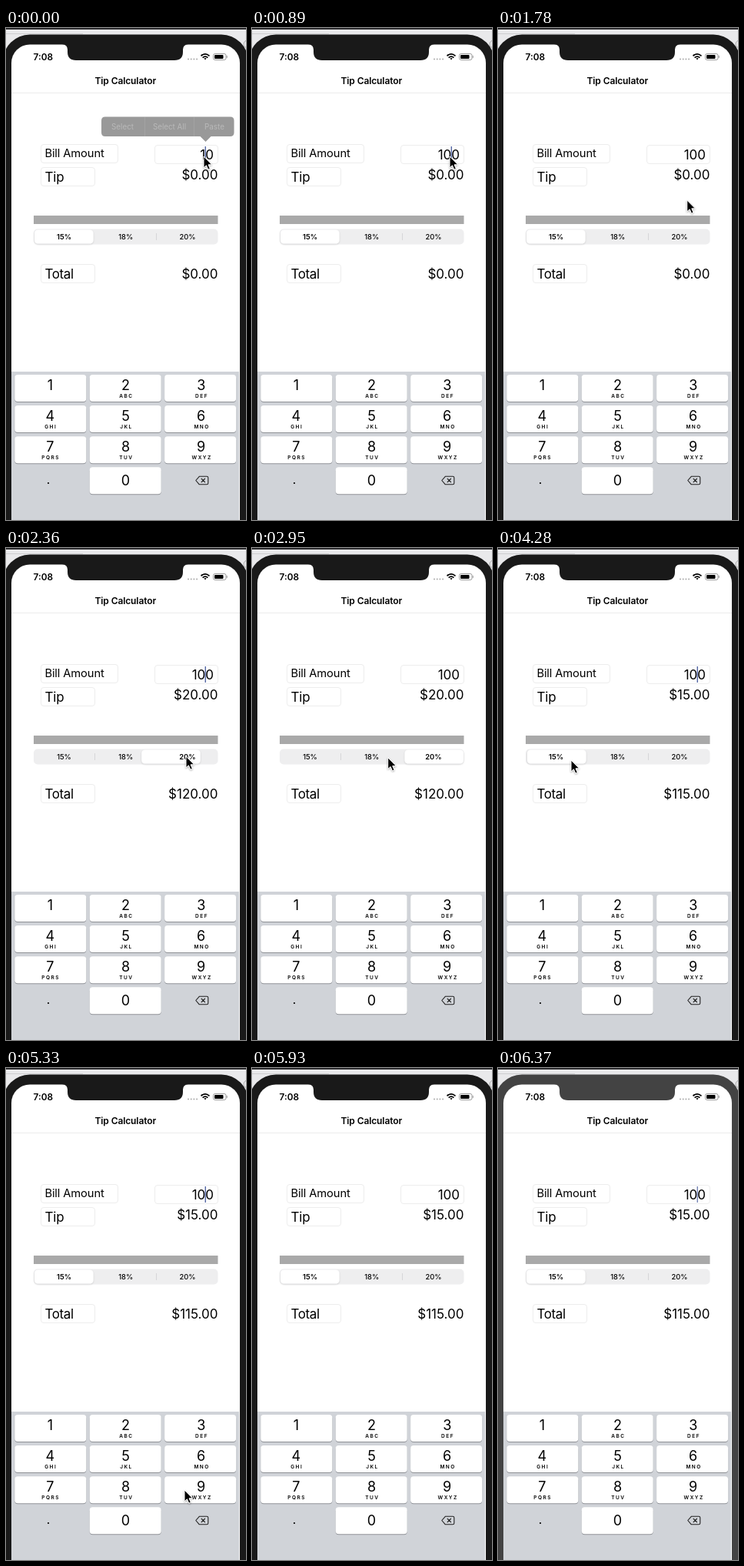
An HTML page that plays this animation: 312 by 640 pixels, repeating every 6.47 s.

```html
<!DOCTYPE html>
<html lang="en">
<head>
<meta charset="utf-8">
<title>Tip Calculator</title>
<style>
  html, body { margin: 0; width: 100%; height: 100%; overflow: hidden; background: #e9e9eb; }
  svg { display: block; width: 312px; height: 640px; }
  text { font-family: Inter, Roboto, "Liberation Sans", sans-serif; fill: #000; }
  .bold { font-weight: 600; }
  .mid { text-anchor: middle; }
  .end { text-anchor: end; }
  .value { font-size: 17px; }
  .box { fill: #fff; stroke: #ededed; }
  .seg { font-size: 9.3px; font-weight: 500; text-anchor: middle; }
  .seg.on { font-weight: 600; }
  .digit { font-size: 18px; text-anchor: middle; }
  .letters { font-size: 6.5px; font-weight: 600; letter-spacing: 1.5px; text-anchor: middle; }
  #menu text { font-size: 9.8px; fill: #b9b9b9; }
</style>
</head>
<body>
<svg id="stage" viewBox="0 0 312 640">
  <defs>
    <filter id="soft" x="-20%" y="-30%" width="140%" height="180%">
      <feDropShadow dx="0" dy="1" stdDeviation="1" flood-opacity=".16"/>
    </filter>
    <filter id="shade" x="-40%" y="-30%" width="190%" height="180%">
      <feDropShadow dx="0" dy="1" stdDeviation=".9" flood-opacity=".35"/>
    </filter>
  </defs>

  <!-- desktop and phone body -->
  <rect width="312" height="640" fill="#e9e9eb"/>
  <rect width="312" height="2" fill="#2c2c2f"/>
  <path d="M0 7.5H100" stroke="#cfcfd1"/>
  <circle cx="314" cy="21" r="5" fill="none" stroke="#aaa"/>
  <rect class="body" x="-4" y="8.5" width="319" height="720" rx="35"/>
  <rect x="7" y="21.5" width="297" height="700" rx="24" fill="#fff"/>
  <path class="body" d="M73 21Q80 22 80 28V31Q80 42 91 42H219Q230 42 230 31V28Q230 22 237 21Z"/>

  <!-- status and title bars -->
  <text class="bold" x="35.5" y="41.5" font-size="11.8">7:08</text>
  <g fill="#aaa">
    <circle cx="237" cy="40.5" r="1"/><circle cx="240.7" cy="40.5" r="1"/>
    <circle cx="244.4" cy="40.5" r="1"/><circle cx="248.1" cy="40.5" r="1"/>
  </g>
  <g fill="none" stroke="#000" stroke-width="1.7">
    <path d="M253.5 36.3Q259 31.4 264.5 36.3M255.6 38.6Q259 35.5 262.4 38.6"/>
    <path d="M257.4 39.6Q259 38.3 260.6 39.6L259 41.4Z" fill="#000" stroke="none"/>
  </g>
  <rect x="269.5" y="33.5" width="16.5" height="8" rx="2.2" fill="none" stroke="#999"/>
  <rect x="271" y="35" width="11.5" height="5" rx="1" fill="#000"/>
  <path d="M287.2 36v3" stroke="#999"/>
  <text class="bold mid" x="155.3" y="73" font-size="12" letter-spacing="-.1">Tip Calculator</text>
  <path d="M7 84.5H304" stroke="#ececec"/>

  <!-- form -->
  <rect class="box" x="45.5" y="151.5" width="100" height="24" rx="3.5"/>
  <rect class="box" x="45.5" y="181.5" width="70" height="24" rx="3.5"/>
  <rect class="box" x="45.5" y="307.5" width="70" height="24" rx="3.5"/>
  <rect class="box" x="193.5" y="152.5" width="82" height="24" rx="3.5"/>
  <text x="50.4" y="168" font-size="14.7" letter-spacing="-.1">Bill Amount</text>
  <text x="50.5" y="200" font-size="17" letter-spacing="-.2">Tip</text>
  <text x="50.5" y="326" font-size="17" letter-spacing="-.4">Total</text>
  <text class="value end" id="amount" x="270" y="171"></text>
  <text class="value end" id="tip" x="275.5" y="197"></text>
  <text class="value end" id="total" x="275.5" y="326"></text>
  <rect id="caret" x="258.6" y="154" width="1.3" height="21" fill="#45599c"/>

  <rect x="36" y="244" width="239.5" height="11" fill="#a9a9a9"/>
  <rect x="36" y="261.5" width="239.5" height="20" rx="5" fill="#eeeeef"/>
  <path id="split0" d="M115.5 267V276" stroke="#d6d6d8"/>
  <path id="split1" d="M195.5 267V276" stroke="#d6d6d8"/>
  <rect id="thumb" y="262.5" width="76.5" height="18" rx="4.5" fill="#fff" filter="url(#soft)"/>
  <g id="segments"></g>

  <g id="menu">
    <path d="M129 115.5H291.5Q296.5 115.5 296.5 120.5V136Q296.5 141 291.5 141H266.5L259.5 148L252.5 141H129Q124 141 124 136V120.5Q124 115.5 129 115.5Z" fill="#999"/>
    <path d="M180.5 116V141M244.5 116V141" stroke="#a3a3a3"/>
    <text class="mid" x="151.5" y="132">Select</text>
    <text class="mid" x="212.5" y="132">Select All</text>
    <text class="mid" x="271" y="132">Paste</text>
  </g>

  <!-- keypad -->
  <rect x="7" y="447" width="296" height="193" fill="#d0d3d8"/>
  <g id="keys"></g>
  <circle cx="55" cy="592" r="1.1"/>
  <path d="M246.8 588.5L251.3 583.3H261Q262.8 583.3 262.8 585V592Q262.8 593.8 261 593.8H251.3ZM253.8 586L258.8 591M258.8 586L253.8 591" fill="none" stroke="#222" stroke-width="1.1" stroke-linejoin="round"/>

  <path id="pointer" d="M0 0V14.8L3.4 11.7L5.8 17.2L8.3 16.1L6 10.8H10.6Z" fill="#000" stroke="#fff" stroke-width="1" filter="url(#shade)"/>
</svg>
<script>
const LOOP = 6470;
const RATES = [15, 18, 20];
const THUMB_X = [37, 117.5, 198.5];
const SLIDE = 300;
// [touch time, segment]
const TAPS = [[2130, 2], [3160, 1], [4000, 0]];
// [time, x, y] of the pointer tip
const PATH = [
  [0, 257, 167], [1200, 257, 167], [1640, 250, 205], [2070, 236, 268], [2360, 234, 271],
  [2600, 232, 272], [3100, 153, 273], [3400, 150.5, 273], [3620, 147, 273],
  [3990, 96, 275], [4280, 95, 276], [4430, 125, 330], [4730, 224, 533],
  [4880, 230, 546], [5030, 232, 549], [5330, 232, 549], [5930, 250, 662]
];

// Evenly spaced picture changes, on whole hundredths of a second.
const run = (from, to, n) =>
  Array.from({ length: n }, (_, i) => 10 * Math.floor((from + i * (to - from) / (n - 1)) / 10));
const TICKS = [0, 150, 450, 590, 890, ...run(1340, 2360, 8), ...run(2510, 3540, 8),
  ...run(3690, 4730, 8), 4880, 5030, ...run(5330, 5930, 5), 6370];

const $ = id => document.getElementById(id);
const money = n => '$' + n.toFixed(2);
const smooth = u => u * u * (3 - 2 * u);
const clamp = u => Math.min(1, Math.max(0, u));

$('segments').innerHTML = RATES.map((rate, i) =>
  `<text class="seg" x="${75.5 + 80.2 * i}" y="275">${rate}%</text>`).join('');
const labels = [...$('segments').children];

function key(col, row, digit, letters) {
  const x = 11.3 + 97.4 * col, y = 451 + 40.1 * row, mid = 57.3 + 98.2 * col;
  const base = y + (digit === 0 ? 24 : 19.6);
  return `<rect x="${x}" y="${y + 1}" width="93" height="35" rx="4" fill="#8e9196"/>
    <rect x="${x}" y="${y}" width="93" height="35" rx="4" fill="#fff"/>
    <text class="digit" x="${mid}" y="${base}">${digit}</text>
    <text class="letters" x="${mid + .9}" y="${y + 29.5}">${letters}</text>`;
}
$('keys').innerHTML = ['', 'ABC', 'DEF', 'GHI', 'JKL', 'MNO', 'PQRS', 'TUV', 'WXYZ']
  .map((letters, i) => key(i % 3, Math.floor(i / 3), i + 1, letters)).join('') + key(1, 3, 0, '');

function pointerAt(t) {
  const i = PATH.findIndex(p => p[0] > t);
  if (i < 0) return PATH[PATH.length - 1].slice(1);
  const [t0, x0, y0] = PATH[i - 1], [t1, x1, y1] = PATH[i];
  const u = (t - t0) / (t1 - t0);
  return [x0 + (x1 - x0) * u, y0 + (y1 - y0) * u];
}

function caretAt(t) {
  const phase = t < 890 ? t : (t - 890) % 1110;
  if (phase < 450) return 1;
  if (phase < 590) return .45;
  return phase > 1000 ? .8 : 0;
}

function draw(time) {
  const t = TICKS.filter(tick => tick <= time).pop();

  let chosen = 0, thumbX = THUMB_X[0];
  for (const [start, segment] of TAPS) {
    if (t < start) break;
    thumbX += (THUMB_X[segment] - thumbX) * smooth(clamp((t - start) / SLIDE));
    chosen = segment;
  }
  const tip = t < TAPS[0][0] ? 0 : RATES[chosen];
  $('amount').textContent = t < 890 ? '10' : '100';
  $('tip').textContent = money(tip);
  $('total').textContent = money(tip && 100 + tip);
  $('thumb').setAttribute('x', thumbX);
  labels.forEach((label, i) => label.classList.toggle('on', i === chosen));
  $('split0').style.opacity = chosen === 2 ? 1 : 0;
  $('split1').style.opacity = chosen === 0 ? 1 : 0;

  $('caret').style.opacity = caretAt(t);
  $('menu').style.display = t < 150 ? '' : 'none';
  const [x, y] = pointerAt(t);
  $('pointer').setAttribute('transform', `translate(${x} ${y})`);
  const body = t < 6370 ? '#191919' : '#434343';
  document.querySelectorAll('.body').forEach(part => part.setAttribute('fill', body));
}

const began = performance.now();
function frame() {
  draw((performance.now() - began) % LOOP);
  requestAnimationFrame(frame);
}
frame();
</script>
</body>
</html>
```
